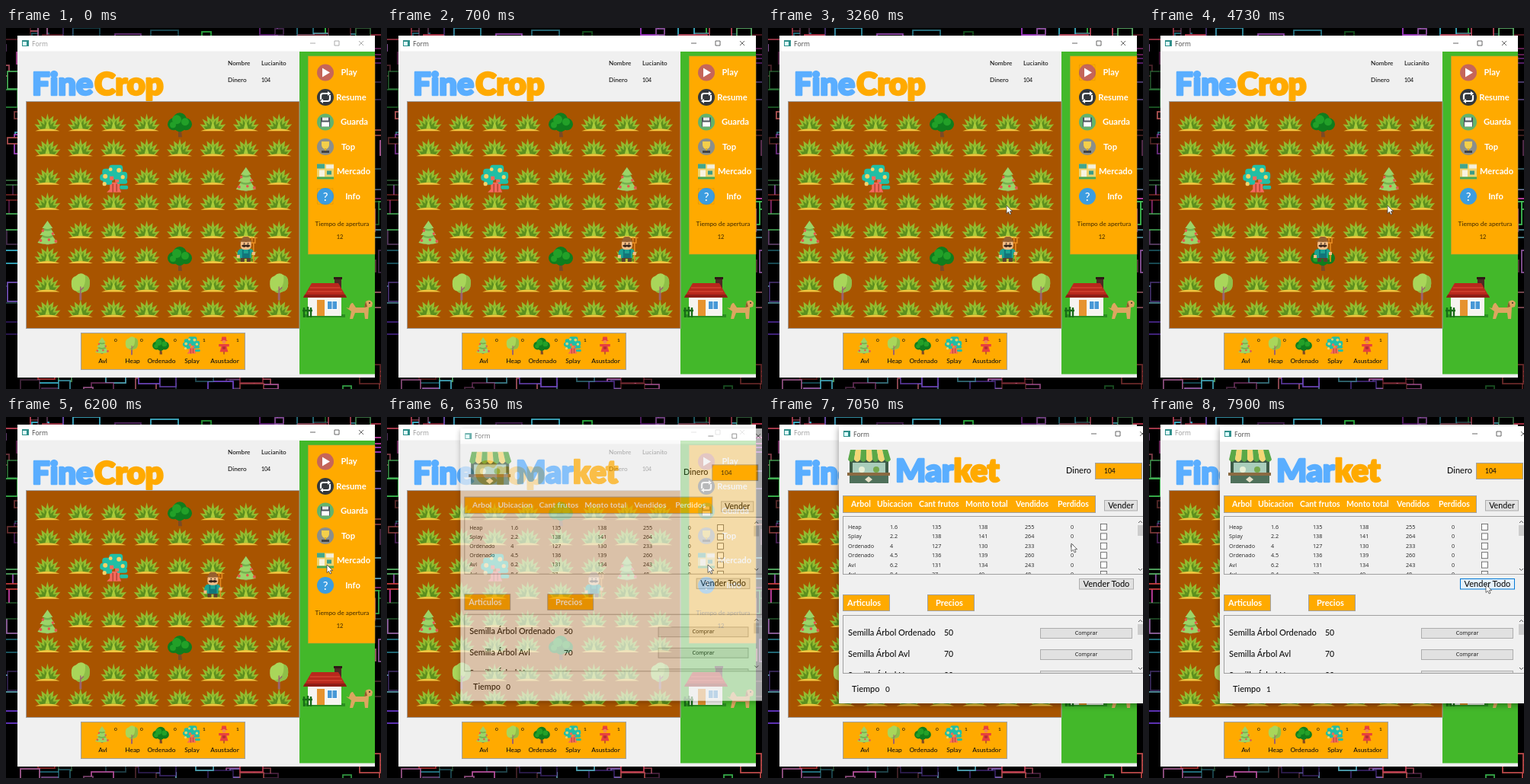
Write an HTML page that moves like this. It is 492 by 474 pixels and loops after 7.99 s.

```html
<!DOCTYPE html>
<html lang="es">
<head>
<meta charset="utf-8">
<title>Form</title>
<style>
html, body { margin: 0; width: 100%; height: 100%; overflow: hidden; background: #000; }
svg { display: block; }
text { white-space: pre; }
.hand { font-family: Lato, sans-serif; font-weight: 500; }
.bold { font-family: Lato, sans-serif; font-weight: 700; }
.ui { font-family: "Open Sans", sans-serif; }
.logo { font: 900 42px Lato, sans-serif; letter-spacing: -.4px; stroke-width: 2.4; stroke-linejoin: round; }
</style>
</head>
<body>
<svg id="stage" width="492" height="474" viewBox="0 0 492 474">
<defs>
  <g id="grass">
    <path fill="#93bb30" d="M-11 9L-17 2L-10 3L-14 -5L-7 -1L-8 -9L-2 -4L0 -12L2 -4L8 -9L7 -1L14 -5L10 3L17 2L11 9Z"/>
    <path fill="#5c8f1f" d="M-9 9L-12 5L-7 5L-9 -1L-4 3L-4 -4L-1 1L0 -4L1 1L4 -4L4 3L9 -1L7 5L12 5L9 9Z"/>
    <path fill="#a9cb38" d="M-3 8L0 -3L3 8Z"/>
    <path fill="#f0c63f" d="M-16 11Q-9 8 0 8T16 11Z"/>
  </g>
  <g id="pine">
    <path fill="#a0703f" d="M-2 11h4v5h-4Z"/>
    <path fill="#9bd468" d="M0 -16L7 -6H4L10 3H6L13 13Q0 17 -13 13L-6 3H-10L-4 -6H-7Z"/>
    <path fill="#74b04f" d="M-4 -6Q0 -4 4 -6L6 -4Q0 -1 -6 -4ZM-6 3Q0 6 6 3L8 5Q0 9 -8 5Z"/>
    <g fill="#e5574d"><circle cx="-6" cy="-3" r="1.8"/><circle cx="7" cy="1" r="1.8"/><circle cx="-9" cy="10" r="2"/><circle cx="2" cy="9" r="1.8"/><circle cx="11" cy="11" r="2"/></g>
  </g>
  <g id="oak">
    <path fill="#7b4a26" d="M-2 17L-2 8L-8 3L0 6L8 3L2 9L3 17Z"/>
    <g fill="#0f7d1d"><circle cx="-8" cy="0" r="8"/><circle cx="8" cy="0" r="8"/><circle cy="-6" r="9"/><circle cy="3" r="7"/></g>
    <g fill="#22a028"><circle cx="-4" cy="-6" r="6"/><circle cx="7" cy="-3" r="5"/><circle cx="-9" cy="1" r="4"/></g>
  </g>
  <g id="round">
    <path fill="#9a6470" d="M-1.5 18V4H1.5V18Z"/>
    <path fill="#a9d65a" d="M-12 -3Q-13 -12 -6 -14Q0 -20 6 -15Q13 -13 12 -4Q12 6 4 7Q-2 10 -6 6Q-12 5 -12 -3Z"/>
    <path fill="#8fbf48" d="M6 -15Q13 -13 12 -4Q12 6 4 7Q-2 10 -6 6Q8 4 6 -15Z"/>
    <path d="M0 10V0M0 5L4 1" stroke="#9a6470" stroke-width="1.4" fill="none"/>
  </g>
  <g id="fancy">
    <path fill="#f4695c" d="M-9 17L-5 13V4H8V12L10 17Z"/>
    <path d="M-1 6V17M4 6V16" stroke="#a9412f" stroke-width="1.3"/>
    <g fill="#20bfa5"><rect x="-15" y="-14" width="19" height="9" rx="4"/><rect x="-6" y="-19" width="18" height="10" rx="4"/><rect x="-18" y="-7" width="19" height="9" rx="4"/><rect x="0" y="-10" width="18" height="11" rx="4"/><rect x="-14" y="0" width="12" height="7" rx="3"/><rect x="4" y="0" width="14" height="6" rx="3"/><rect x="8" y="8" width="11" height="5" rx="2"/></g>
    <g fill="#f7d268"><circle cx="-11" cy="-4" r="3"/><circle cx="7" cy="-12" r="3"/><circle cx="12" cy="-3" r="2.6"/><circle cx="-12" cy="6" r="2.6"/><circle cx="-4" cy="-13" r="2.4"/></g>
    <path fill="#f4695c" d="M-5 -4h5v5h-5ZM2 0h5v4h-5Z"/>
  </g>
  <g id="farmer">
    <path d="M10 16V-9M8 -16V-9H12V-16" stroke="#e58a20" stroke-width="1.6" fill="none"/>
    <path fill="#5a4030" d="M-7 8H6V16H1V12H-2V16H-7Z"/>
    <path fill="#1ba294" d="M-11 8V3Q-10 -1 -5 -1H5Q9 -1 10 3L7 5V11H-8V6Z"/>
    <path fill="#12757a" d="M-5 0h2V5H3V0H5V11H-5Z"/>
    <path fill="#f2bd86" d="M-12 7h4v4h-4ZM8 3h4v4h-4Z"/>
    <rect x="-7" y="-13" width="14" height="13" rx="5" fill="#f2bd86"/>
    <path fill="#38251b" d="M-6 -5Q-3 -8 0 -6Q3 -8 6 -5Q3 -2 0 -4Q-3 -2 -6 -5ZM-3 -9h1.5v1.5H-3ZM2 -9h1.5v1.5H2Z"/>
    <path fill="#96602f" d="M-10 -11L-6 -12Q-5 -18 0 -17Q5 -18 6 -12L10 -11Q0 -9 -10 -11Z"/>
  </g>
  <g id="scarecrow">
    <path fill="#a03a3a" d="M-1 3h2v14h-2Z"/>
    <path fill="#e8413e" d="M-10 -3H10V2H5L8 12H-8L-5 2H-10ZM-8 -9L-5 -10L-4 -17H4L5 -10L8 -9Z"/>
    <circle cy="-7" r="3.5" fill="#f08a4a"/><path fill="#b52f35" d="M-3 2h6v5h-6Z"/>
  </g>
  <g id="cursor"><path d="M0 0V10.5L2.5 8.3L4.2 12L6 11.2L4.4 7.7H7.6Z" fill="#fff" stroke="#333" stroke-width=".7"/></g>
  <filter id="shadow" x="-10%" y="-10%" width="120%" height="120%"><feDropShadow dx="0" dy="2" stdDeviation="4" flood-opacity=".4"/></filter>
</defs>
<g id="wallpaper" fill="#000"></g>
<g id="farm"></g>
<use id="player" href="#farmer"/>
<rect id="focus" x="408.5" width="20.5" height="20.5" fill="none" stroke="#222" stroke-opacity=".3" stroke-width=".6" stroke-dasharray="1 1"/>
<g id="market" filter="url(#shadow)"></g>
<use id="pointer" href="#cursor"/>
</svg>
<script>
const LOOP = 7990, TICK = 77.5;
const ORANGE = '#ffaa00', BLUE = '#5aaeff', FACE = '#f0f0f0', EDGE = '#a0a0a0';
const $ = id => document.getElementById(id);
const clamp = v => Math.max(0, Math.min(1, v));
const range = n => [...Array(n).keys()];

const rect = (x, y, w, h, fill, stroke = 'none', more = '') =>
  `<rect x="${x}" y="${y}" width="${w}" height="${h}" fill="${fill}" stroke="${stroke}" ${more}/>`;
const text = (x, y, str, size = 11, fill = '#111', anchor = 'start', cls = 'hand') =>
  `<text x="${x}" y="${y}" font-size="${size}" fill="${fill}" text-anchor="${anchor}" class="${cls}">${str}</text>`;
const mid = (x, y, str, size, fill, cls) => text(x, y, str, size, fill, 'middle', cls);
const path = (d, fill, stroke = 'none', width = 1) =>
  `<path d="${d}" fill="${fill}" stroke="${stroke}" stroke-width="${width}"/>`;
const line = (d, color, width) => path(d, 'none', color, width);
const disc = (x, y, r, fill) => `<circle cx="${x}" cy="${y}" r="${r}" fill="${fill}"/>`;
const sprite = (name, x, y, scale = 1) =>
  `<use href="#${name}" transform="translate(${x} ${y}) scale(${scale})"/>`;
const group = (x, y, body) => `<g transform="translate(${x} ${y})">${body}</g>`;
const logo = (x, y, first, second) =>
  `<text x="${x}" y="${y}" class="logo" fill="${BLUE}" stroke="${BLUE}">${first}<tspan fill="${ORANGE}" stroke="${ORANGE}">${second}</tspan></text>`;

const colX = c => 54.4 + 43.4 * c;
const rowY = r => 124.3 + 70.4 * (r >> 1) + 33 * (r % 2);

function titleBar(id, x, y, w, buttons) {
  const by = y + 10;
  return rect(x, y, w, 20.5, '#fff') + rect(x + 6, y + 6, 9, 8, '#2f8f8a') + rect(x + 7, y + 8, 5, 5, '#dff') +
    `<g id="${id}">` + text(x + 19, y + 13.5, 'Form', 8.5, '#444', 'start', 'ui') +
    line(`M${buttons} ${by}h7m25 -3h6v6h-6Zm32 0l6 6m0 -6l-6 6`, '#555', .9) + '</g>';
}

function menuIcons() {
  const art = [
    disc(0, 0, 11, '#c5665a') + path('M-4 -6L6 0L-4 6Z', '#fff'),
    disc(0, 0, 11, '#34383c') + line('M-6 3V-2Q-6 -5 -3 -5H4M6 -3V2Q6 5 3 5H-4', '#fff', 2.2) +
      path('M3 -8L7 -5L3 -2ZM-3 8L-7 5L-3 2Z', '#fff'),
    disc(0, 0, 11, '#62b36d') + rect(-6, -6, 12, 12, '#4b555c') + rect(-4, -6, 8, 4, '#e8e8e8') + rect(-5, 0, 10, 6, '#fff'),
    disc(0, 0, 11, '#8c8f8a') + path('M-5 -7H5V-2Q4 3 0 3T-5 -2Z', '#f4cf4a') + rect(-1, 2, 2, 4, '#d9ad2c') + rect(-5, 5, 10, 3, '#444'),
    rect(-11, -10, 22, 20, '#eed36e') + rect(-11, -10, 10, 6, '#41a68f') + rect(1, -9, 10, 5, '#f5efdc') +
      rect(-8, -2, 7, 9, '#f7f3e0') + rect(2, -1, 6, 5, '#3b9b88') + rect(-11, 7, 22, 3, '#49a653'),
    disc(0, 0, 11, '#3c9de0') + mid(0, 5.5, '?', 15, '#fff'),
  ];
  const labels = [['Play', 450], ['Resume', 453], ['Guarda', 457], ['Top', 449], ['Mercado', 456], ['Info', 455]];
  return labels.map(([label, x], i) =>
    group(419, 58.5 + 32.5 * i, art[i]) + mid(x, 62 + 32.5 * i, label, 11.2, '#fff', 'bold')).join('');
}

function house() {
  return rect(391, 376, 54, 4, '#2a8f20') + rect(396, 350, 44, 28, '#f6f4f0') +
    rect(431, 328, 9, 15, '#4c2a24') + rect(430, 327, 11, 3, '#2f1916') +
    path('M390 354L401 335H436L447 354Z', '#b8281c') + path('M390 354L392 350H445L447 354Z', '#8e1d16') +
    line('M396 346H441M399 341H438', '#d2402f', 1.3) +
    rect(408, 357, 10, 21, '#e6932f') + rect(421.5, 358.5, 13, 11, '#4798d6', '#fff') + line('M428 358V370', '#fff') +
    line('M391 380V367M396 380V366M400 380V367M389 371H402', '#176b16', 2.4) +
    path('M446 367L450 368Q452 360 455 361L459 367H470L472 359Q478 355 481 361L480 366L476 367L475 382H471L470 374H458L455 382H451L453 372Z', '#dca660') +
    path('M472 359L470 367L474 366Z', '#8f5a2d') + disc(477, 361, .9, '#222');
}

function farmView() {
  const trees = { '4,0': 'oak', '2,2': 'fancy', '6,2': 'pine', '0,4': 'pine', '4,5': 'oak', '1,6': 'round', '7,6': 'round' };
  const field = range(64).map(i => {
    const c = i % 8, r = i >> 3, tree = trees[[c, r]];
    return sprite(tree || 'grass', colX(c), rowY(r) + (tree ? (r ? 4 : 2) : 0));
  }).join('');
  const stock = [['pine', 126, 'Avl', 144, 0], ['round', 165, 'Heap', 178, 0], ['oak', 203, 'Ordenado', 222, 0],
    ['fancy', 243, 'Splay', 260, 1], ['scarecrow', 286, 'Asustador', 304, 1]];
  return rect(15, 10, 469, 449, FACE) + titleBar('farmTitle', 15, 10, 469, 399) +
    rect(385, 31, 99, 423.5, '#43b82a') + rect(396.5, 37, 87.5, 260, ORANGE, '#c79a3a', 'stroke-width=".6"') +
    logo(34, 88, 'Fine', '') + logo(116, 88, '', 'Crop') +
    text(291, 49, 'Nombre', 8.2) + text(335, 49, 'Lucianito', 8.2) + text(291, 71, 'Dinero', 8.2) + text(335, 71, '104', 7) +
    rect(26.5, 96.5, 358.5, 298, '#a85400', EDGE) + field +
    menuIcons() + mid(441, 260, 'Tiempo de apertura', 8.2, '#4a3000') + mid(438, 277, '12', 7.5, '#4a3000') + house() +
    rect(98.5, 400.5, 215, 48, ORANGE, EDGE) +
    stock.map(([name, x, label, cx, count]) => sprite(name, x, 417, name === 'fancy' ? .62 : .68) +
      mid(x + 1, 440, label, 8.4) + mid(cx, 412, count, 6.5)).join('');
}

function stall() {
  const stripes = range(7).map(i => path(`M${108 + 7 * i} 43h7l${i - 2} 13q-4 6 -8 0Z`, i % 2 ? '#f3d774' : '#5aa847')).join('');
  return rect(107, 56, 51, 27, '#3d5b47') + rect(111, 60, 43, 13, '#a9cdbb') + disc(123, 69, 4, '#e8f0d8') + disc(142, 69, 4, '#75a94e') +
    rect(104, 73, 56, 4, '#8b6a43') + rect(107, 77, 51, 10, '#50705a') + path('M127 82l5 -4l5 4l-5 4Z', '#e4e0c8') + stripes;
}

const button = (id, x, y, w, h, label, size, cls) =>
  rect(x + .5, y + .5, w, h, '#e1e1e1', '#adadad', `id="${id}"`) + mid(x + w / 2 + .5, y + h / 2 + size * .36, label, size, '#111', cls);

function scrollPane(y, h, handle, body) {
  return rect(98.5, y + .5, 400, h, FACE, EDGE) +
    `<svg x="99" y="${y + 1}" width="386" height="${h - 1}" viewBox="99 ${y + 1} 386 ${h - 1}">${body}</svg>` +
    rect(485, handle, 7, 14, '#cdcdcd') + line(`M486 ${y + 9}l2.5 -2.5l2.5 2.5M486 ${y + h - 7}l2.5 2.5l2.5 -2.5`, '#555');
}

function marketView() {
  const heads = [['Arbol', 109], ['Ubicacion', 143], ['Cant frutos', 198], ['Monto total', 259], ['Vendidos', 325], ['Perdidos', 380]];
  const sales = ['Heap 1.6 135 138 255 0', 'Splay 2.2 138 141 264 0', 'Ordenado 4 127 130 233 0',
    'Ordenado 4.5 136 139 260 0', 'Avl 6.2 131 134 243 0', 'Avl 8.4 37 40 48 0'];
  const cellX = [105, 160, 215, 276, 337, 397];
  const salesRows = sales.map((row, i) => row.split(' ').map((cell, c) =>
    text(cellX[c], 147 + 12.4 * i, cell, 7.2, '#222', 'start', 'ui')).join('') +
    rect(436.5, 140.5 + 12.4 * i, 8, 8, '#fff', '#555', 'stroke-width=".8"')).join('');
  const goods = [['Ordenado', 50], ['Avl', 70], ['Heap', 90]].map(([kind, price], i) =>
    text(105, 287 + 28 * i, 'Semilla Árbol ' + kind, 11) + text(231, 287 + 28 * i, price, 10.5) +
    button('buy' + i, 357, 277 + 28 * i, 120, 13, 'Comprar', 7.2, 'ui')).join('');
  const tag = (x, w, label, tx) => rect(x + .5, 233.5, w, 21, ORANGE, EDGE) + text(tx, 248, label, 11, '#fff', 'start', 'bold');
  return rect(93, 12, 410, 364, FACE) + titleBar('marketTitle', 93, 12, 410, 424) + stall() + logo(167, 85, 'Mar', 'ket') +
    text(391, 74, 'Dinero', 11) + rect(429.5, 60.5, 61, 21, ORANGE, EDGE) + text(441, 74, '104', 8.5) +
    rect(98.5, 103.5, 331, 22, ORANGE, EDGE) + heads.map(([h, x]) => text(x, 118, h, 10.5, '#fff', 'start', 'bold')).join('') +
    button('sell', 441, 109, 43, 13.5, 'Vender', 10.7) + scrollPane(130, 76, 142, salesRows) +
    button('sellAll', 408, 212, 71, 13.5, 'Vender Todo', 11) +
    tag(98, 61, 'Articulos', 104) + tag(209, 61, 'Precios', 220) + scrollPane(260, 76, 272, goods) +
    text(110, 361, 'Tiempo', 11) + `<g id="clock">${text(154, 361, '0', 10)}</g>`;
}

function wallpaper() {
  let seed = 11;
  const rnd = n => (seed = seed * 16807 % 2147483647) / 2147483647 * n;
  const hues = [285, 315, 130, 190, 350, 260, 0];
  return range(420).map(() => {
    const color = `hsl(${hues[Math.floor(rnd(7))]} ${Math.round(25 + rnd(40))}% 52%)`;
    const [x, y] = [rnd(510) - 16, rnd(490) - 14].map(Math.round);
    return rect(x, y, Math.round(8 + rnd(30)), Math.round(6 + rnd(24)), '#000', color, 'stroke-width="1.8"');
  }).join('');
}

$('wallpaper').innerHTML = wallpaper();
$('farm').innerHTML = farmView();
$('market').innerHTML = marketView();
const outlines = [...$('wallpaper').children], clockText = $('clock').firstChild;

// [time, column, row] of the farmer, [time, button] of the focus, [time, x, y] of the pointer
const steps = [[0, 6, 5], [3720, 6, 4], [4100, 6, 5], [4420, 5, 5], [4730, 4, 5], [4970, 4, 4], [5210, 4, 3], [5450, 5, 3]];
const focusSteps = [[0, 5], [1070, 4], [1390, 3], [2080, 4], [2400, 3], [2710, 2], [3010, 1], [3260, 0], [3490, -1]];
const route = [[1390, 304, 232], [1690, 313, 233], [4950, 313, 233], [5510, 396, 208], [6000, 421, 194], [6740, 421, 194],
  [7045, 398, 166], [7270, 420, 138], [7500, 461, 115], [7600, 461, 115], [7890, 442, 220], [LOOP, 442, 220]];

const current = (list, t) => list.findLast(item => item[0] <= t);
function pointerAt(t) {
  const i = route.findIndex(p => p[0] > t);
  if (i < 1) return route[0].slice(1);
  const [t0, x0, y0] = route[i - 1], [t1, x1, y1] = route[i], u = (t - t0) / (t1 - t0), e = u * u * (3 - 2 * u);
  return [x0 + (x1 - x0) * e, y0 + (y1 - y0) * e];
}
function hover(id, on) {
  $(id).setAttribute('fill', on ? '#e5f1fb' : '#e1e1e1');
  $(id).setAttribute('stroke', on ? '#0078d7' : '#adadad');
}

function draw(t) {
  const held = Math.max(0, 6350 + Math.floor((t - 6350) / TICK) * TICK);
  const phase = clamp((held - 70) / 690) + clamp((held - 5570) / 780);
  outlines.forEach((o, i) => o.setAttribute('stroke-opacity', .68 + .3 * Math.sin(i * 2.4 + phase * 2)));

  const [, col, row] = current(steps, t);
  $('player').setAttribute('transform', `translate(${colX(col)} ${rowY(row) - 7})`);
  const focus = current(focusSteps, t)[1];
  $('focus').setAttribute('y', 48.2 + 32.5 * focus);
  $('focus').setAttribute('visibility', focus < 0 ? 'hidden' : 'visible');

  const open = clamp((held - 6275) / 310), scale = 1 - .055 * (1 - open) ** 4;
  const farmActive = t >= 70 && open === 0;
  $('farmTitle').setAttribute('opacity', farmActive ? 1 : .55);
  $('market').setAttribute('opacity', clamp(open * 2.9));
  $('market').setAttribute('transform', `translate(280 190) scale(${scale}) translate(-280 -190)`);
  clockText.textContent = t < 7200 ? 0 : 1;
  hover('sell', t >= 7430 && t < 7660);
  hover('sellAll', t >= 7820);

  $('pointer').setAttribute('transform', `translate(${pointerAt(held)})`);
  $('pointer').setAttribute('visibility', t < 1390 ? 'hidden' : 'visible');
}

function frame() {
  draw(performance.now() % LOOP);
  requestAnimationFrame(frame);
}
frame();
</script>
</body>
</html>
```
